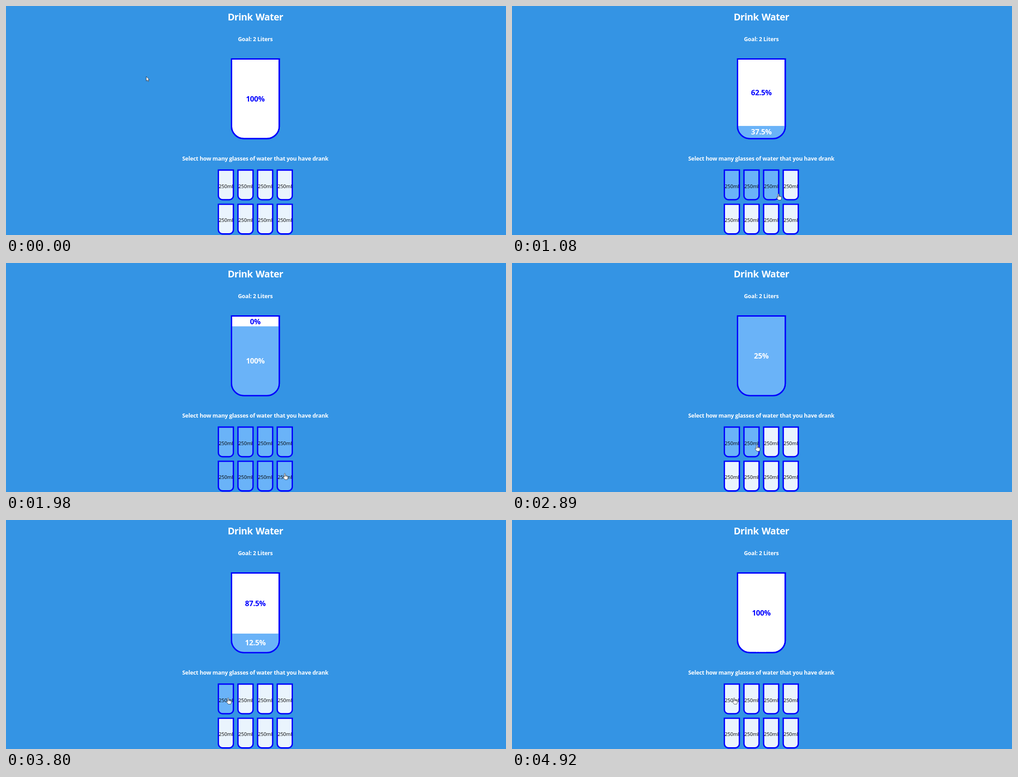
Recreate the animation shown at these times as an HTML page. Size 1103 by 508 pixels, loop 6.01 s.

```html
<!DOCTYPE html>
<html lang="en">
<head>
<meta charset="utf-8">
<title>Drink Water</title>
<style>
  html, body { margin: 0; width: 100%; height: 100%; overflow: hidden; background: #3494e4; }
  svg { display: block; width: 100%; height: 100%; }
  text { font-family: "Open Sans", "Noto Sans", sans-serif; text-anchor: middle; fill: #fff; }
  .bold { font-weight: 700; letter-spacing: -.0167em; }
  .title { font-size: 21px; letter-spacing: -.03em; word-spacing: .08em; }
  .line { font-size: 12.3px; }
  .percent { font-size: 16.2px; }
  .label { font-size: 10.9px; fill: #000; }
  .border { fill: none; stroke: #00f; stroke-width: 2.9; }
  .pointer { fill: #fff; stroke: #1c2430; stroke-width: .8; stroke-linejoin: round; }
</style>
</head>
<body>
<svg id="stage" viewBox="0 0 1103 508">
  <defs><clipPath id="inside"><path id="insideShape"/></clipPath></defs>
  <text class="bold title" x="550" y="32">Drink Water</text>
  <text class="bold line" x="550" y="78">Goal: 2 Liters</text>
  <path id="cup" class="border" style="fill:#fff"/>
  <g clip-path="url(#inside)">
    <rect id="water" x="497" width="107" fill="#6ab3f8"/>
    <text id="drunk" class="bold percent" x="550"></text>
  </g>
  <text id="left" class="bold percent" x="550" style="fill:#00f"></text>
  <path id="rim" class="border"/>
  <text class="bold line" x="550" y="342.5">Select how many glasses of water that you have drank</text>
  <g id="glasses"></g>
  <g id="cursor">
    <path id="arrow" class="pointer" d="M.4 .4V10.4L2.7 8.3 4.3 11.7 5.9 11 4.4 7.7H7.4Z"/>
    <path id="hand" class="pointer" d="M-1.2 1.5Q0-.6 1.2 1.5V5.3Q2.4 4.6 3.2 5.8 4.5 5.3 5.2 6.5 6.9 6.3 7 8V10.8L5.8 14.6H.2L-3.6 9.6Q-4.2 7.8-2.6 8L-1.2 9.2ZM1.2 5.3V7.8M3.2 5.8V8M5.2 6.5V8.3"/>
    <circle id="press" r="9" fill="#f6f455" opacity=".85"/>
  </g>
</svg>
<script>
const LOOP = 6010, STEP = 100, TRAVEL = 600, EASE_MS = 400;
const TOTAL = 8, TOP = 118.9, BOTTOM = 292.7, FULL = BOTTOM - TOP, LINE = 21.6;

// Where the pointer goes, when it arrives and clicks, and how many glasses are then drunk
const visits = [
  { x: 309, y: 156, arrive: 0, click: -LOOP, hold: 0, count: 0 },
  { x: 576, y: 395, arrive: 670, click: 1000, hold: 0, count: 3 },
  { x: 615, y: 466, arrive: 1580, click: 1800, hold: 200, count: 8 },
  { x: 540, y: 403, arrive: 2800, click: 2900, hold: 0, count: 2 },
  { x: 490, y: 394, arrive: 3500, click: 3752, hold: 150, count: 1 },
  { x: 490, y: 394, arrive: 4200, click: 4510, hold: 120, count: 0 }
];

const $ = id => document.getElementById(id);
const show = (el, on) => { el.style.visibility = on ? 'visible' : 'hidden'; };
const mix = (a, b, k) => a + (b - a) * k;

// Outline of a beaker with rounded bottom corners, inset by half its border
function beaker(x, y, width, height, radius) {
  const half = 1.45, r = radius - half, w = width - 2 * half, h = height - 2 * half;
  return `M${x + half} ${y + half}h${w}v${h - r}a${r} ${r} 0 0 1 ${-r} ${r}` +
    `h${2 * r - w}a${r} ${r} 0 0 1 ${-r} ${-r}z`;
}

function make(tag, attrs, parent) {
  const el = document.createElementNS('http://www.w3.org/2000/svg', tag);
  for (const key in attrs) el.setAttribute(key, attrs[key]);
  return parent.appendChild(el);
}

const cupShape = beaker(496, 116, 108.3, 179.6, 28.9);
for (const id of ['cup', 'rim', 'insideShape']) $(id).setAttribute('d', cupShape);

const GLASS_W = 36.1, GLASS_H = 68.6;
const glasses = Array.from({ length: TOTAL }, (_, i) => {
  const x = 467 + i % 4 * 43.3, y = 362.6 + (i >> 2) * 75.8;
  const shape = make('path', { class: 'border', d: beaker(x, y, GLASS_W, GLASS_H, 10.8) }, $('glasses'));
  make('text', { class: 'label', x: x + GLASS_W / 2, y: y + 41 }, $('glasses')).textContent = '250ml';
  return { x, y, shape };
});

// CSS "ease": cubic-bezier(.25, .1, .25, 1)
function ease(x) {
  if (x <= 0 || x >= 1) return x <= 0 ? 0 : 1;
  const curve = (u, a, b) => 3 * u * (1 - u) ** 2 * a + 3 * u * u * (1 - u) * b + u ** 3;
  let lo = 0, hi = 1;
  for (let i = 0; i < 24; i++) {
    const mid = (lo + hi) / 2;
    if (curve(mid, .25, .25) < x) lo = mid; else hi = mid;
  }
  return curve(lo, .1, 1);
}

function setPercent(el, count, middle) {
  el.textContent = count / TOTAL * 100 + '%';
  el.setAttribute('y', middle + 6);
}

function drawCup(t) {
  const i = visits.findLastIndex(v => v.click <= t);
  const { click, count } = visits[i];
  const before = i ? visits[i - 1].count : 0;
  const p = ease((t - click) / EASE_MS);
  const leftShown = !(count === TOTAL && p === 1) && !(before === TOTAL && p === 0);
  let height = FULL * mix(before, count, p) / TOTAL;
  if (leftShown) height = Math.min(height, FULL - LINE);
  const level = BOTTOM - height, wet = height > 0;

  $('water').setAttribute('y', level);
  $('water').setAttribute('height', height + 3);
  show($('water'), wet);
  show($('drunk'), wet);
  show($('left'), leftShown);
  setPercent($('drunk'), count, (level + BOTTOM) / 2);
  setPercent($('left'), TOTAL - count, (TOP + level) / 2);
  glasses.forEach((g, n) => { g.shape.style.fill = n < count ? '#6ab3f8' : '#eaf4fd'; });
}

function drawCursor(t) {
  let { x, y } = visits[0];
  for (const v of visits) {
    const k = ease((t - v.arrive) / TRAVEL + 1);
    x = mix(x, v.x, k);
    y = mix(y, v.y, k);
  }
  const over = glasses.some(g => x >= g.x && x <= g.x + GLASS_W && y >= g.y && y <= g.y + GLASS_H);
  $('cursor').setAttribute('transform', `translate(${x} ${y})`);
  show($('hand'), over);
  show($('arrow'), !over);
  show($('press'), visits.some(v => t >= v.click - v.hold && t < v.click));
}

const begin = performance.now();
function frame() {
  const now = (performance.now() - begin) % LOOP;
  const t = Math.floor((now + 20) / STEP) * STEP;
  drawCup(t);
  drawCursor(t);
  requestAnimationFrame(frame);
}
frame();
</script>
</body>
</html>
```
